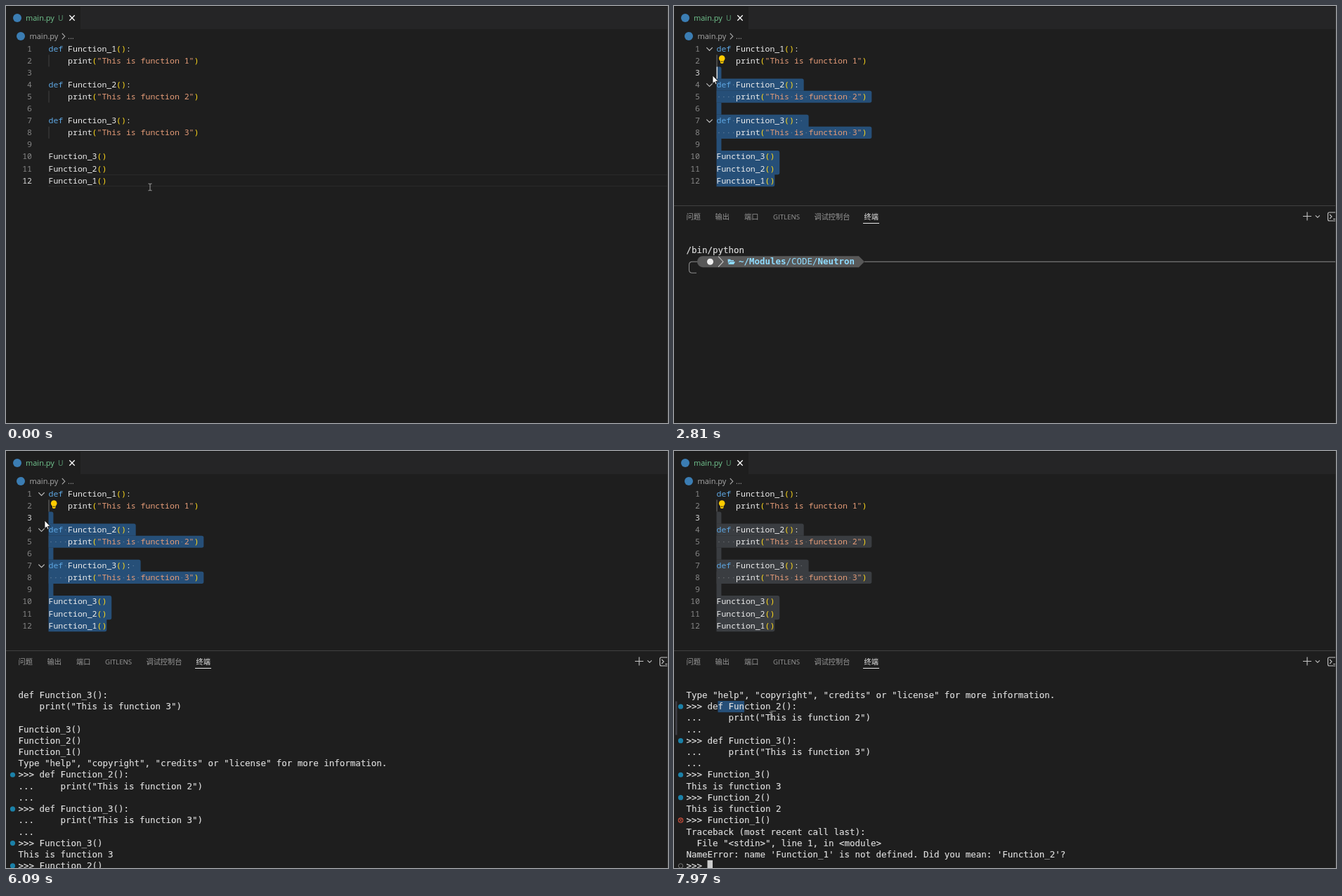
Write an HTML page that moves like this. It is 942 by 594 pixels and loops after 8 s.

```html
<!DOCTYPE html>
<html lang="zh-CN">
<head>
<meta charset="utf-8">
<title>Run selection in Python terminal</title>
<style>
  html, body { margin: 0; width: 100%; height: 100%; overflow: hidden; background: #1e1e1e; }
  svg { display: block; width: 100vw; height: 100vh; }
  text { white-space: pre; fill: #ccc; }
  .ui { font: 11px "Open Sans", "Noto Sans", sans-serif; }
  .crumb { fill: #a9a9a9; }
  .tab { font: 10.2px "Open Sans", "Noto Sans CJK SC", sans-serif; fill: #989898; }
  .tab.latin { font-size: 9.7px; }
  .tab.open { fill: #e7e7e7; }
  .code text { font: 11.5px "Noto Sans Mono", "DejaVu Sans Mono", monospace; fill: #ececec; }
  .code .src { font-weight: 500; }
  .code .num { fill: #858585; text-anchor: end; }
  .code .num.active { fill: #d8d8d8; font-weight: 500; }
  .code .key { fill: #5da5e0; }
  .code .str { fill: #e59c78; }
  .code .par { fill: #ffd91a; }
  .guide { fill: #404040; }
  .guide.active { fill: #707070; }
  .term .out { font: 12.46px "DejaVu Sans Mono", monospace; fill: #dedede; stroke: #dedede; stroke-width: .15; }
  .term .path { fill: #8fdcff; stroke: none; }
  .bold { font-weight: bold; }
  .line { fill: none; stroke: #c5c5c5; stroke-width: 1.1; }
</style>
</head>
<body>
<svg viewBox="0 0 942 594">
  <rect width="942" height="594" fill="#1e1e1e"/>
  <rect x="106" width="836" height="33" fill="#252526"/>
  <rect width="942" height="1" fill="#191919"/>

  <circle cx="16" cy="17" r="6" fill="#3b7db3"/>
  <text class="ui" x="28" y="21" style="fill:#73c991">main.py</text>
  <text class="ui" x="74" y="21" style="fill:#5a9a72;font-size:10.4px">U</text>
  <path class="line" style="stroke:#fff;stroke-width:1.3" d="M90.3 13.3l7.4 7.4m0-7.4l-7.4 7.4"/>
  <circle cx="21" cy="43" r="6" fill="#3b7db3"/>
  <text class="ui crumb" x="33.5" y="47">main.py</text>
  <path class="line" style="stroke:#a9a9a9" d="M79.8 39l4 4.2-4 4.2"/>
  <text class="ui crumb" x="88" y="47">...</text>

  <g class="code">
    <g id="current" fill="#2a2a2a">
      <rect x="60" y="240" width="881" height="1"/><rect x="60" y="256" width="881" height="1"/>
    </g>
    <g id="guides"></g>
    <g id="selection"></g>
    <g id="source"></g>
    <g id="folds" class="line"></g>
    <g id="bulb" fill="#ffcc00">
      <circle cx="68.2" cy="74.6" r="4.3"/><path d="M66 77h4.4v4.3q-2.2 1.6-4.4 0z"/>
      <rect x="67.2" y="78.6" width="2" height="1.2" fill="#1e1e1e"/>
    </g>
    <rect id="caret" width="1.5" height="17" fill="#d0d0d0"/>
  </g>

  <g id="panel" class="term">
    <rect y="284" width="942" height="310" fill="#1e1e1e"/>
    <rect y="284" width="942" height="1" fill="#414141"/>
    <g id="tabs"></g>
    <rect x="269" y="309" width="23" height="1" fill="#e7e7e7"/>
    <path class="line" d="M895 299.5h12M901 293.5v12M912.8 298.3l3 3 3-3M942 294h-9.5q-2 0-2 2v8q0 2 2 2H942M933 297l3 3-3 3M938 303.5h4"/>
    <rect id="hoverBar" x="2" y="356.5" width="2.5" height="48" fill="#3f3f46"/>
    <rect id="termSelection" x="62.5" y="356" height="16.2" fill="#264f78"/>
    <g id="log"></g>
    <rect id="block" x="47.5" y="583" width="7.5" height="11" fill="#ccc"/>
  </g>

  <rect x="941" width="1" height="594" fill="#343434"/>
  <path id="ibeam" fill="none" stroke="#b4b4b4" stroke-width=".9" d="M-2.5-4.8H-.8L0-4.2.8-4.8H2.5M-2.5 4.8H-.8L0 4.2.8 4.8H2.5M0-4.2V4.2"/>
  <path id="arrow" fill="#fff" stroke="#111" stroke-width=".8" d="M0 0V11.5L2.6 9 4.3 12.8 6 12 4.4 8.3H8z"/>
</svg>
<script>
const LOOP = 8000;
const $ = id => document.getElementById(id);
const show = (id, on) => { $(id).style.display = on ? '' : 'none'; };
const clamp = (v, lo, hi) => Math.max(lo, Math.min(hi, v));
const escapeText = s => s.replace(/&/g, '&amp;').replace(/</g, '&lt;').replace(/>/g, '&gt;');

// Editor
const LEFT = 60.5, TOP = 52.4, CHAR = 6.9, LINE = 17.06;
const define = n => [`def Function_${n}():${n === 3 ? ' ' : ''}`, `    print("This is function ${n}")`, ''];
const source = [...define(1), ...define(2), ...define(3), 'Function_3()', 'Function_2()', 'Function_1()'];
const anchor = { row: 11, col: 12 };
const rowTop = row => TOP + row * LINE;

const highlight = s => s.replace(/"[^"]*"|\bdef\b|[()]/g, m => {
  const kind = m[0] === '"' ? 'str' : m === 'def' ? 'key' : 'par';
  return `<tspan class="${kind}">${m}</tspan>`;
});
$('source').innerHTML = source.map((s, i) => {
  const y = rowTop(i) + 12.5;
  return `<text class="num" x="37" y="${y}">${i + 1}</text><text class="src" x="${LEFT}" y="${y}">${highlight(s)}</text>`;
}).join('');
$('guides').innerHTML = [1, 4, 7].map(r =>
  `<rect class="guide" x="60.5" y="${rowTop(r)}" width="1" height="17"/>`).join('');
$('folds').innerHTML = [0, 3, 6].map(r =>
  `<path d="M46.3 ${rowTop(r) + 6.8}l4.2 4.2 4.2-4.2"/>`).join('');
const numbers = document.querySelectorAll('.num');
const guides = document.querySelectorAll('.guide');

function selectionMarkup(head, color) {
  const rows = [];
  for (let row = head.row; row <= anchor.row; row++) {
    const from = row === head.row ? head.col : 0;
    const to = row === anchor.row ? anchor.col : source[row].length + 1;
    if (to > from) rows.push({ row, from, to });
  }
  return rows.map(({ row, from, to }, i) => {
    const x = LEFT + from * CHAR, right = LEFT + to * CHAR, y = rowTop(row);
    const a = to > (rows[i - 1]?.to ?? 0) ? 2.7 : 0;
    const b = to > (rows[i + 1]?.to ?? 0) ? 2.7 : 0;
    const shape = `<path fill="${color}" d="M${x} ${y}H${right - a}q${a} 0 ${a} ${a}V${y + LINE + 0.1 - b}q0 ${b} ${-b} ${b}H${x}z"/>`;
    const dots = [...source[row]].map((c, col) => c === ' ' && col >= from
      ? `<circle cx="${LEFT + (col + 0.5) * CHAR}" cy="${y + 8.8}" r=".8" fill="#fff" opacity=".23"/>` : '');
    return shape + dots.join('');
  }).join('');
}

// Terminal
const TERM_LEFT = 17.5, TERM_CHAR = 7.5, TERM_LINE = 16.21, TERM_ROWS = 16;
const tabs = [['问题', 17.5], ['输出', 58.5], ['端口', 100], ['GITLENS', 141, 'latin'], ['调试控制台', 199.5], ['终端', 270.5, 'open']];
$('tabs').innerHTML = tabs.map(([label, x, kind = '']) =>
  `<text class="tab ${kind}" x="${x}" y="303.6">${label}</text>`).join('');

const prompt = `
  <path class="line" style="stroke:#8a8a8a" d="M34 16H26q-4.5 0-4.5 4.5V27.5q0 4.5 4.5 4.5h6M271 16H941"/>
  <path fill="#585858" d="M41 8H263L271 16 263 24H41a8 8 0 0 1 0-16z"/>
  <circle cx="51.5" cy="16" r="4.5" fill="#eee"/>
  <path class="line" d="M63 8.5L70 16 63 23.5"/>
  <path fill="#8fdcff" d="M76.5 12.5h3.5l1 1.2h4v1.5h-6l-2 3.5zM79.5 16H87l-2 3.7h-7.8z"/>
  <text class="out path" x="92" y="20"><tspan class="bold">~/Modules</tspan>/CODE/<tspan class="bold">Neutron</tspan></text>`;
const typed = source.slice(3).map((s, i) => (i ? s : '   ' + s));
const repl = [
  'Type "help", "copyright", "credits" or "license" for more information.',
  ...[2, 3].flatMap(n => [`>>> def Function_${n}():`, `...     print("This is function ${n}")`, '...']),
  ...[3, 2].flatMap(n => [`>>> Function_${n}()`, `This is function ${n}`]),
  '>>> Function_1()', 'Traceback (most recent call last):', '  File "<stdin>", line 1, in <module>',
  "NameError: name 'Function_1' is not defined. Did you mean: 'Function_2'?", '>>> '
];
const log = ['/bin/python', null, ...typed, ...repl];

function marker(s) {
  if (!s.startsWith('>>>')) return '';
  if (s === '>>> ') return '<circle cx="9.5" cy="15.8" r="3.2" fill="none" stroke="#777"/>';
  if (s.includes('_1')) return '<g fill="none" stroke="#d0503c" stroke-width="1.1"><circle cx="9.5" cy="15.8" r="3.2"/><path d="M8 14.3l3 3m0-3l-3 3"/></g>';
  return '<circle cx="9.5" cy="15.8" r="3.6" fill="#1b81a8"/>';
}
$('log').innerHTML = log.map(s => `<g>${s === null ? prompt
  : `${marker(s)}<text class="out" x="${TERM_LEFT}" y="20">${escapeText(s)}</text>`}</g>`).join('');
const logRows = [...$('log').children];

function logCount(t) {
  if (t < 2680) return 0;
  if (t < 5480) return 2;
  if (t < 5950) return 11;
  return Math.min(log.length, 11 + Math.ceil((t - 5949) / 15));
}

// Pointer: [time, x, y]
const pointerPath = [
  [90, 205, 258], [390, 152, 250], [840, 110, 145], [890, 105, 134], [1150, 66, 109],
  [1360, 55, 99], [6200, 55, 99], [6560, 75, 123], [6750, 80, 134], [6890, 80, 134],
  [7650, 64, 361], [7750, 62, 364], [7970, 138, 377]
];
function pointerAt(t) {
  const next = pointerPath.findIndex(p => p[0] > t);
  if (next === 0) return pointerPath[0].slice(1);
  if (next < 0) return pointerPath.at(-1).slice(1);
  const [t0, x0, y0] = pointerPath[next - 1], [t1, x1, y1] = pointerPath[next];
  const k = (t - t0) / (t1 - t0);
  return [x0 + (x1 - x0) * k, y0 + (y1 - y0) * k];
}
function headAt(t) {
  if (t < 390) return anchor;
  const [x, y] = pointerAt(Math.min(t, 1400));
  const row = clamp(Math.floor((y - TOP) / LINE), 0, 11);
  return { row, col: clamp(Math.round((x - LEFT) / CHAR), 0, source[row].length) };
}

const caretOn = [[390, 1700], [2200, 3040], [3560, 4030], [4540, 5060], [5500, 6030], [6530, 7030], [7530, 7730]];
const BLUR = 7730;
let lastSelection = '', lastCount = -1;

function render(t) {
  const head = headAt(t), [x, y] = pointerAt(t);
  const selectionKey = [head.row, head.col, t >= BLUR].join();
  if (selectionKey !== lastSelection) {
    lastSelection = selectionKey;
    $('selection').innerHTML = selectionMarkup(head, t >= BLUR ? '#3a3d41' : '#264f78');
    numbers.forEach((n, i) => n.classList.toggle('active', i === head.row));
    guides.forEach((g, i) => g.classList.toggle('active', head.row < 9 && i === Math.floor(head.row / 3)));
    $('caret').setAttribute('x', LEFT + head.col * CHAR);
    $('caret').setAttribute('y', rowTop(head.row));
    show('current', head.row === anchor.row && head.col === anchor.col);
  }
  show('caret', caretOn.some(([a, b]) => t >= a && t < b));
  show('bulb', t >= 1600);
  $('folds').style.opacity = Math.min(clamp((t - 1550) / 500, 0, 1), clamp((6770 - t) / 500, 0, 1));

  show('panel', t >= 2580);
  const count = logCount(t);
  if (count !== lastCount) {
    lastCount = count;
    const first = Math.max(0, count - TERM_ROWS);
    logRows.forEach((g, i) => {
      g.style.display = i >= first && i < count ? '' : 'none';
      g.setAttribute('transform', `translate(0 ${332 + (i - first) * TERM_LINE})`);
    });
  }
  show('hoverBar', t > 7000 && y > 356);
  show('block', t >= BLUR);
  const picked = Math.round(clamp((t - 7770) / 180, 0, 1) * 5);
  $('termSelection').setAttribute('width', picked * TERM_CHAR);

  const inGutter = x < 60;
  show('arrow', inGutter);
  show('ibeam', !inGutter);
  $(inGutter ? 'arrow' : 'ibeam').setAttribute('transform', `translate(${x} ${y})`);
}

const start = performance.now();
function tick() {
  render((performance.now() - start) % LOOP);
  requestAnimationFrame(tick);
}
tick();
</script>
</body>
</html>
```
